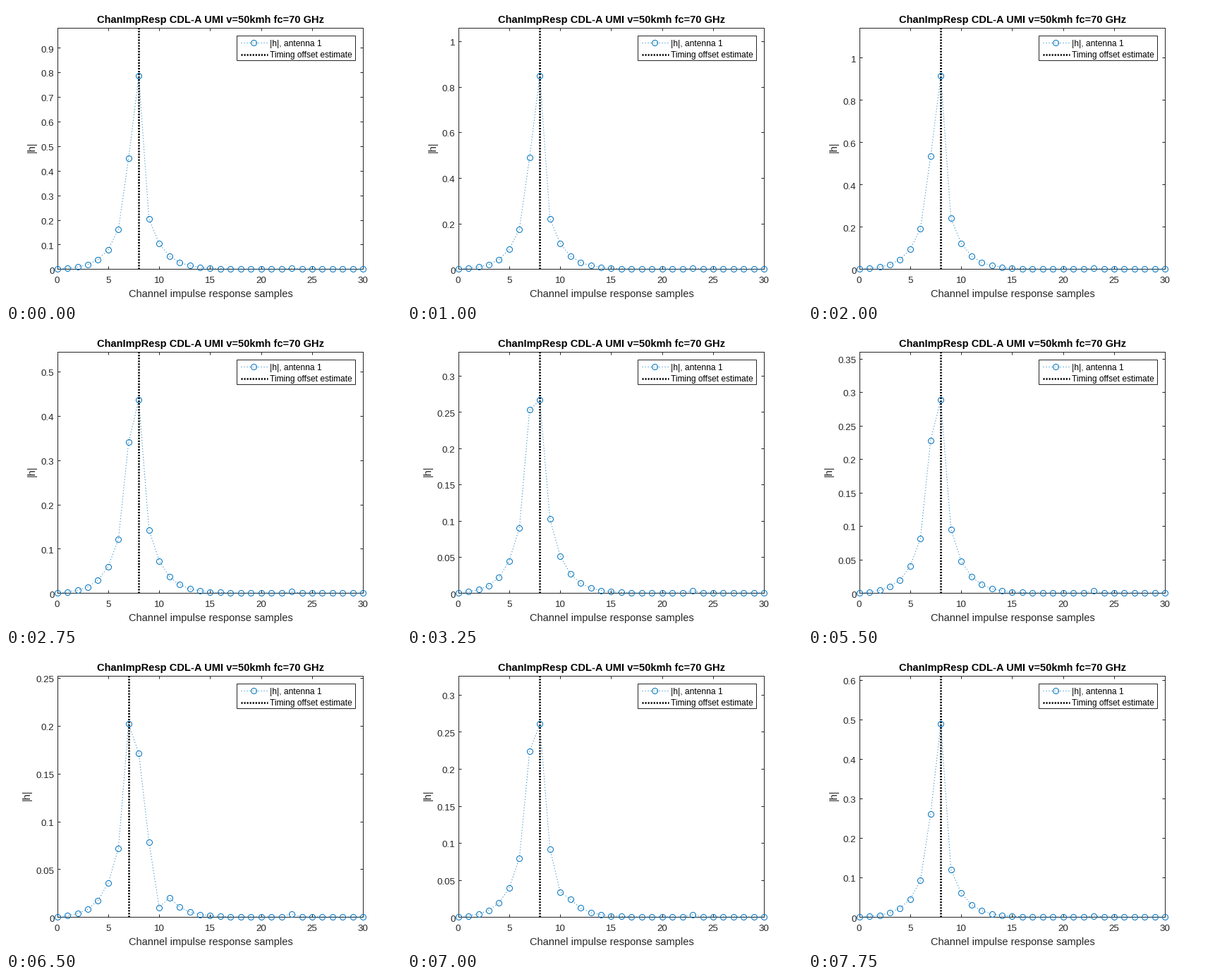
A matplotlib script that plays this animation: 560 px wide and 420 px high, repeating every 8 s.

```python
from itertools import zip_longest

import numpy as np
import matplotlib
import matplotlib.pyplot as plt
from matplotlib.animation import FuncAnimation
from matplotlib.lines import Line2D
from matplotlib.patches import Rectangle
from matplotlib.transforms import ScaledTranslation

matplotlib.rcParams["font.family"] = "Liberation Sans"

W, H, DPI = 560, 420, 80
PX = 72 / DPI                     # one pixel in points
FRAMES, INTERVAL = 32, 250
BLUE, GREY = "#0072BD", "#262626"

# Key points of the fading: step, magnitude of sample 7, of sample 8
KEYS = [(0, .452, .785), (8, .533, .913), (13, .2528, .2664), (17, .243, .465),
        (22, .228, .288), (26, .2017, .1713), (31, .2605, .488)]
STEPS, EARLY, LATE = zip(*KEYS)
NULLS = (17, 26)                  # steps where sample 10 fades out


def fade(i, mags):
    return np.exp(np.interp(i, STEPS, np.log(mags)))


def response(i):
    k = np.arange(31)
    early, late = fade(i, EARLY), fade(i, LATE)
    rise = early * (.36 * 2.0 ** (k - 6) - .004)
    decay = (.33 * early + .07 * late) * .51 ** (k - 9)
    h = np.maximum(np.where(k < 7, rise, decay), .0003)
    h[7], h[8] = early, late
    h[10] *= 1 - .75 * sum(np.exp(-((i - n) / 2) ** 2) for n in NULLS)
    h[23] = .0032                 # weak late echo
    return h


def tick_step(top):
    return next(s for s in (.02, .05, .1, .2, .5) if top / s <= 10.4)


fig = plt.figure(figsize=(W / DPI, H / DPI), dpi=DPI, facecolor="white")
ax = fig.add_axes([72.6 / W, 46.7 / H, 433.7 / W, 342.3 / H])
ax.set_xlim(0, 30)
ax.set_xticks(range(0, 31, 5))
ax.tick_params(direction="in", top=True, right=True, length=4.3 * PX,
               width=PX, color=GREY, labelcolor=GREY, labelsize=13.33 * PX)
ax.tick_params(axis="x", pad=10.3 * PX)
ax.tick_params(axis="y", labelleft=False)
for spine in ax.spines.values():
    spine.set(linewidth=PX, color=GREY)

shift = ScaledTranslation(-4.1 / DPI, -6.2 / DPI, fig.dpi_scale_trans)
ylabels = [ax.text(0, 0, "", fontsize=13.33 * PX, color=GREY, ha="right",
                   va="baseline", transform=ax.get_yaxis_transform() + shift)
           for _ in range(12)]


def text(x, y, s, size, **kw):
    return fig.text(x / W, 1 - y / H, s, fontsize=size * PX, **kw)


text(290, 24, "ChanImpResp CDL-A UMI v=50kmh fc=70 GHz", 14.67,
     ha="center", va="baseline", weight="bold", color="black")
text(290, 412.5, "Channel impulse response samples", 14.67,
     ha="center", va="baseline", color=GREY)
ytitle = text(36.5, 200.5, "|h|", 14.67, ha="center", va="center",
              rotation=90, color=GREY)

CURVE = dict(color=BLUE, lw=PX, ls=(0, (1, 3)), marker="o", ms=8 * PX,
             mfc="none", mec=BLUE, mew=PX)
OFFSET = dict(color="black", lw=2.7 * PX, ls=(0, (.75, .75)))

curve, = ax.plot(range(31), np.zeros(31), clip_on=False, zorder=5, **CURVE)
offset = ax.axvline(8, zorder=6, **OFFSET)


def legend_line(xs, y, **style):
    fig.add_artist(Line2D([x / W for x in xs], [1 - y / H] * len(xs),
                          zorder=11, **style))


fig.add_artist(Rectangle((327 / W, 1 - 77 / H), 168 / W, 35 / H, fc="white",
                         ec=GREY, lw=PX, zorder=10))
legend_line([332.5, 351, 370.5], 52, markevery=[1], **CURVE)
legend_line([332.5, 370.5], 69, **OFFSET)
for y, label in ((56.5, "|h|, antenna 1"), (73.5, "Timing offset estimate")):
    text(374, y, label, 12, va="baseline", color="black", zorder=11)


def draw(i):
    h = response(i)
    top = 1.25 * h.max()
    step = tick_step(top)
    ticks = step * np.arange(int(top / step + 1e-6) + 1)
    ax.set_ylim(0, top)
    ax.set_yticks(ticks)
    for label, t in zip_longest(ylabels, ticks):
        label.set_text("" if t is None else f"{t:.4g}")
        label.set_y(t or 0)
    ytitle.set_x((36.5 if step >= .1 else 29.5) / W)
    curve.set_ydata(h)
    offset.set_xdata([h.argmax()] * 2)
    return curve, offset, ytitle, *ylabels


anim = FuncAnimation(fig, draw, frames=FRAMES, init_func=lambda: draw(0),
                     interval=INTERVAL, repeat=True, repeat_delay=0, blit=False)
plt.show()
```
